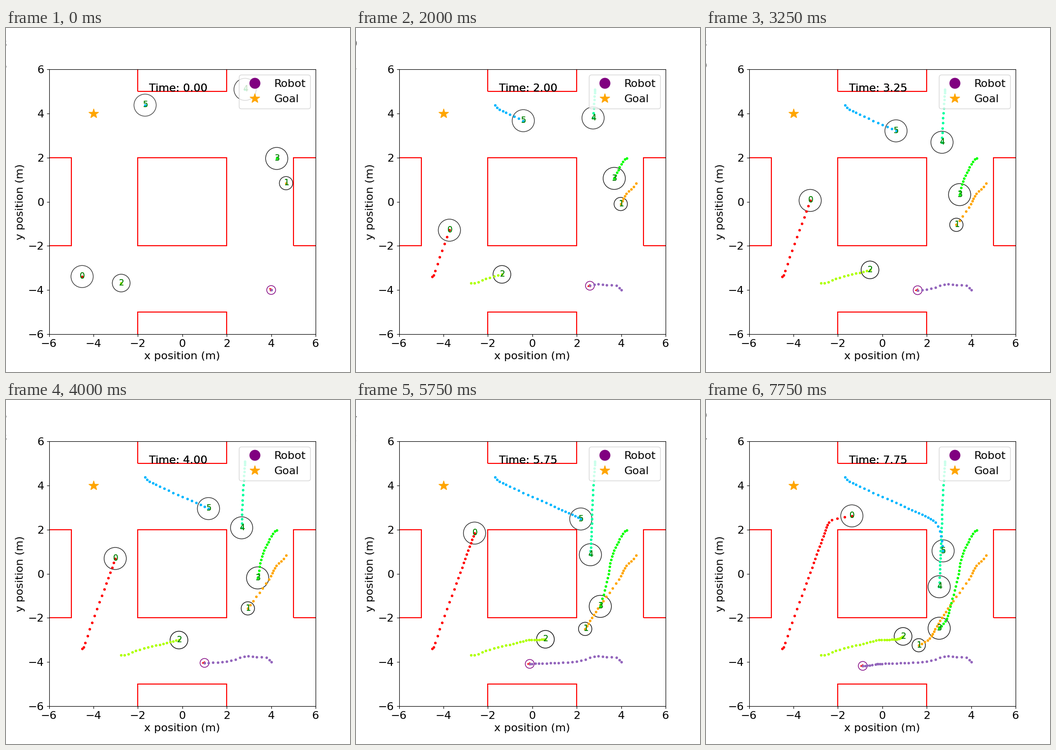
Recreate the animation shown at these times as a matplotlib script. Size 700x700 px, loop 8000 ms.

```python
import random

import matplotlib as mpl
import matplotlib.pyplot as plt
import numpy as np
from matplotlib.animation import FuncAnimation
from matplotlib.lines import Line2D
from matplotlib.patches import ArrowStyle, Circle, FancyArrowPatch, Rectangle

STEPS, DT = 32, 0.25
ROBOT_R = 0.2
RADII = [0.5, 0.3, 0.4, 0.5, 0.5, 0.5]
KNOTS = [0, 1, 4, 11, 16, 23, 27, 31]


def smooth(t, v):
    """Monotone cubic interpolation of v(t) at every step."""
    h = np.diff(t)
    s = np.diff(v) / h
    a, b = s[:-1], s[1:]
    same = a * b > 0
    inner = np.where(same, 2 * a * b / np.where(same, a + b, 1), 0)
    m = np.concatenate([s[:1], inner, s[-1:]])
    k = np.arange(STEPS)
    i = np.clip(np.searchsorted(t, k, side="right") - 1, 0, len(h) - 1)
    u = (k - t[i]) / h[i]
    return ((1 + 2 * u) * (1 - u) ** 2 * v[i] + u * (1 - u) ** 2 * h[i] * m[i]
            + u * u * (3 - 2 * u) * v[i + 1] + u * u * (u - 1) * h[i] * m[i + 1])


def make_path(xs, ys, *turns):
    """Path through xs, ys at KNOTS and through extra (step, x, y) turns."""
    points = sorted([*zip(KNOTS, xs, ys), *turns])
    t, x, y = np.array(points, float).T
    return np.column_stack([smooth(t, x), smooth(t, y)])


robot_path = make_path(
    [4, 3.92, 3.345, 2, 1, -0.116, -0.459, -0.88],
    [-4, -3.9, -3.775, -3.975, -4.04, -4.085, -4.14, -4.175],
    (2, 3.777, -3.785), (6, 2.98, -3.73), (26, -0.315, -4.1))
human_paths = [
    make_path([-4.51, -4.45, -4.17, -3.42, -3.02, -2.6, -2.41, -1.37],
              [-3.39, -3.33, -2.51, -0.43, 0.69, 1.84, 2.33, 2.62],
              (28, -2.27, 2.44)),
    make_path([4.67, 4.573, 4.24, 3.62, 2.95, 2.38, 2.14, 1.64],
              [0.84, 0.69, 0.36, -0.66, -1.57, -2.5, -2.92, -3.24],
              (9, 3.9, -0.245)),
    make_path([-2.75, -2.595, -2.085, -0.857, -0.15, 0.59, 0.78, 0.935],
              [-3.685, -3.685, -3.485, -3.17, -3.005, -2.97, -2.93, -2.84]),
    make_path([4.25, 4.165, 3.93, 3.545, 3.39, 3.06, 2.9, 2.56],
              [1.96, 1.915, 1.57, 0.635, -0.19, -1.48, -2.035, -2.47]),
    make_path([2.825, 2.82, 2.79, 2.7, 2.67, 2.615, 2.59, 2.56],
              [5.09, 5.03, 4.62, 3.12, 2.08, 0.86, 0.22, -0.59]),
    make_path([-1.675, -1.587, -1.178, 0.216, 1.178, 2.184, 2.593, 2.737],
              [4.375, 4.265, 4.03, 3.395, 2.95, 2.48, 1.926, 1.035],
              (25, 2.39, 2.325)),
]

plt.rcParams["font.family"] = "DejaVu Sans"
fig, ax = plt.subplots(figsize=(7, 7), dpi=100)
ax.set(xlim=(-6, 6), ylim=(-6, 6))
ax.tick_params(labelsize=16)
ax.set_xlabel("x position (m)", fontsize=16)
ax.set_ylabel("y position (m)", fontsize=16)

# Walls: a centre block and one block reaching in from each side
for x, y in [(0, 0), (-7, 0), (7, 0), (0, -7), (0, 7)]:
    ax.add_patch(Rectangle((x - 2, y - 2), 4, 4, fill=False, ec="red",
                           lw=1.5, zorder=2))


def marker(shape, color, x=0, y=0):
    return Line2D([x], [y], color=color, marker=shape, ls="None", ms=15)


goal = ax.add_line(marker("*", "orange", -4, 4))
ax.legend([marker("o", "purple"), goal], ["Robot", "Goal"],
          fontsize=16, loc="upper right")


def heavy_text(x, y, text, **style):
    """Text drawn twice, which thickens its edges."""
    label = ax.text(x, y, text, **style)
    ax.add_artist(label)
    return label


def trail(color):
    return ax.plot([], [], "o", color=color, ms=3, mew=0.8)[0]


hsv = mpl.colormaps["hsv"].resampled(10)
clock = heavy_text(-1.5, 5, "", fontsize=16)
# Two readouts run off the left edge; only their last digit shows
readouts = [ax.text(-8.665, y, "", fontsize=16) for y in (7, 6)]
rng = random.Random(4)
digits = [[rng.randrange(10) for _ in range(STEPS)] for _ in readouts]

robot = ax.add_patch(Circle((0, 0), ROBOT_R, fill=False, ec="purple"))
arrow = ax.add_patch(FancyArrowPatch(
    (0, 0), (1, 0), color="red",
    arrowstyle=ArrowStyle("->", head_length=4, head_width=2)))
bodies = [ax.add_patch(Circle((0, 0), r, fill=False, ec="black")) for r in RADII]
numbers = [heavy_text(0, 0, str(i), color="green", fontsize=12)
           for i in range(len(RADII))]
robot_trail = trail("tab:purple")
trails = [trail(hsv(i)) for i in range(len(RADII))]


def update(k):
    clock.set_text(f"Time: {k * DT:.2f}")
    for readout, row in zip(readouts, digits):
        readout.set_text(f"0.{row[k]}")

    pos = robot_path[k]
    step = max(k, 1)
    move = robot_path[step] - robot_path[step - 1]
    robot.center = pos
    arrow.set_positions(pos, pos + ROBOT_R * move / np.hypot(*move))
    robot_trail.set_data(*robot_path[:k + 1].T)

    for path, body, number, dots in zip(human_paths, bodies, numbers, trails):
        x, y = body.center = path[k]
        # Nearer people are outlined more strongly
        body.set_alpha(min(1, 1.02 - 0.03 * np.hypot(*(path[k] - pos))))
        number.set_position((x - 0.1, y - 0.1))
        dots.set_data(*path[:k + 1].T)


anim = FuncAnimation(fig, update, frames=STEPS, init_func=lambda: update(0),
                     interval=250, repeat=True, repeat_delay=0, blit=False)
plt.show()
```
